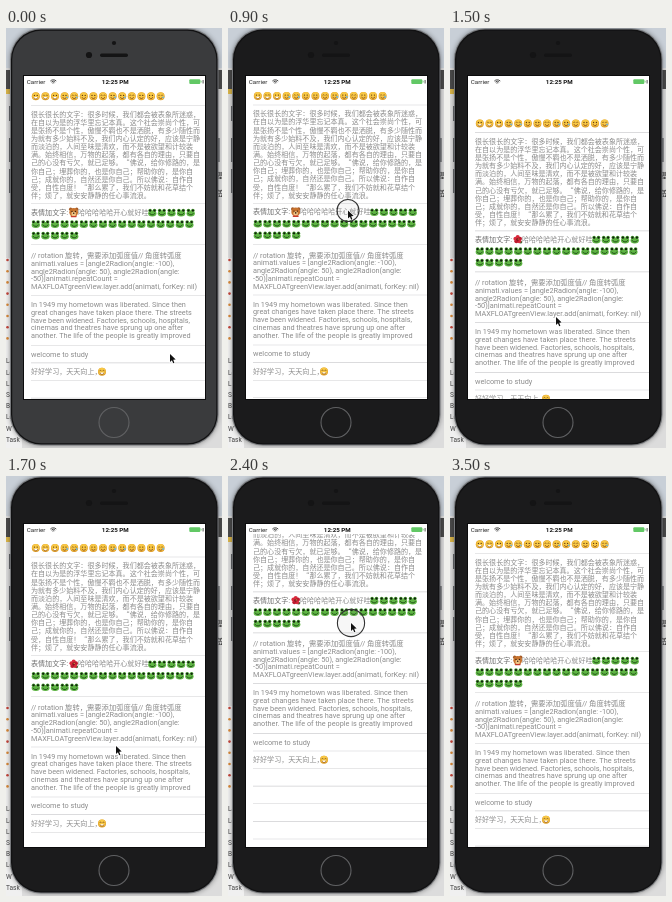
Write an HTML page with a canvas that moves like this. It is 216x420 px and loops after 3.6 s.

```html
<!DOCTYPE html>
<html lang="zh">
<head>
<meta charset="utf-8">
<title>Simulator scrolling</title>
<style>
html, body { margin: 0; width: 100%; height: 100%; overflow: hidden; background: #ddd; }
canvas { display: block; width: 216px; height: 420px; }
</style>
</head>
<body>
<canvas id="stage"></canvas>
<script>
const W = 216, H = 420, LOOP = 3600, STEP = 100;
const SCREEN = { x: 18, y: 48, w: 181, h: 323 };
const LEFT = 25, CJK = 7.06, LATIN = 7.3, EMOJI = 9.6;
const GRAY = '#8b8b8b';
const SANS = 'Roboto, "Noto Sans CJK SC", "Noto Sans CJK", sans-serif';
const HAN = '"Noto Sans CJK SC", "Noto Sans CJK", sans-serif';

const canvas = document.getElementById('stage');
const g = canvas.getContext('2d');
const dpr = window.devicePixelRatio || 1;
canvas.width = W * dpr;
canvas.height = H * dpr;

const essay = [
  '很长很长的文字：很多时候，我们都会被表象所迷惑，',
  '在自以为是的浮华里忘记本真。这个社会崇尚个性，可',
  '是张扬不是个性，傲慢不羁也不是洒脱，有多少随性而',
  '为就有多少始料不及，我们内心认定的好，应该是宁静',
  '而淡泊的，人间至味是清欢，而不是被欲望和计较装',
  '满。始终相信，万物的起落，都有各自的理由，只要自',
  '己的心没有亏欠，就已足够。“佛说，给你修路的，是',
  '你自己；埋葬你的，也是你自己；帮助你的，是你自',
  '己；成就你的，自然还是你自己。所以佛说：自作自',
  '受，自性自度！“那么累了，我们不妨就和花草结个',
  '伴；烦了，就安安静静的任心事流浪。'
];
const code = [
  '// rotation 旋转，需要添加弧度值// 角度转弧度',
  'animati.values = [angle2Radion(angle: -100),',
  'angle2Radion(angle: 50), angle2Radion(angle:',
  '-50)]animati.repeatCount =',
  'MAXFLOATgreenView.layer.add(animati, forKey: nil)'
];
const story = [
  'In 1949 my hometown was liberated. Since then',
  'great changes have taken place there. The streets',
  'have been widened. Factories, schools, hospitals,',
  'cinemas and theatres have sprung up one after',
  'another. The life of the people is greatly improved'
];

// Pointer path: time, x, y
const path = [
  [0, 164, 326], [300, 160, 320], [500, 158, 316], [850, 120, 182], [950, 120, 183],
  [1350, 106, 289], [1500, 106, 289], [1700, 110, 270], [1800, 111, 262],
  [2000, 115, 193], [2400, 123, 147], [2500, 123, 147], [2800, 123, 148],
  [3300, 235, 250], [3600, 235, 250]
];
const drags = [
  { down: 850, up: 1370, from: 183 },
  { down: 1720, up: 2460, from: 262 }
];

const clamp = (v, a, b) => Math.min(b, Math.max(a, v));
const smooth = p => p * p * (3 - 2 * p);

function pointer(t) {
  let i = 1;
  while (i < path.length - 1 && path[i][0] < t) i++;
  const [t0, x0, y0] = path[i - 1], [t1, x1, y1] = path[i];
  const p = smooth(clamp((t - t0) / (t1 - t0), 0, 1));
  return { x: x0 + (x1 - x0) * p, y: y0 + (y1 - y0) * p };
}

function rubber(d) {
  const size = SCREEN.h;
  return Math.sign(d) * size * (1 - 1 / (Math.abs(d) * 0.64 / size + 1));
}

function scrollAt(t) {
  const drag = drags.filter(d => t >= d.down).pop();
  if (!drag) return 0;
  const pull = rubber(pointer(Math.min(t, drag.up)).y - drag.from);
  if (t <= drag.up) return pull;
  const s = (t - drag.up) / 75;
  return s > 4.4 ? 0 : pull * (1 + s) * Math.exp(-s);
}

function disc(x, y, r, fill) {
  g.fillStyle = fill;
  g.beginPath();
  g.arc(x, y, r, 0, Math.PI * 2);
  g.fill();
}

function ring(x, y, r, color, width, a = 0, b = Math.PI * 2) {
  g.strokeStyle = color;
  g.lineWidth = width;
  g.beginPath();
  g.arc(x, y, r, a, b);
  g.stroke();
}

function box(x, y, w, h, fill, r = 0) {
  g.fillStyle = fill;
  g.beginPath();
  g.roundRect(x, y, w, h, r);
  g.fill();
}

function text(str, x, y, size, color, family = SANS, align = 'left', weight = 400) {
  g.font = `${weight} ${size}px ${family}`;
  g.fillStyle = color;
  g.textAlign = align;
  g.textBaseline = 'alphabetic';
  g.fillText(str, x, y + size * 0.36);
}

function lines(list, y, gap, size, family) {
  list.forEach((s, i) => text(s, LEFT, y + i * gap, size, GRAY, family));
}

// Draws n glyphs side by side, starting at the left edge x
function emojis(glyph, n, x, y) {
  for (let i = 0; i < n; i++) glyph(x + (i + 0.5) * EMOJI, y, i);
}

function face(x, y, kind) {
  disc(x, y, 4, '#dd9a24');
  disc(x, y - 0.4, 3.5, '#f8c845');
  if (kind % 3 === 1) {
    ring(x - 1.5, y - 0.5, 0.8, '#70451a', 0.6, Math.PI, 0);
    ring(x + 1.5, y - 0.5, 0.8, '#70451a', 0.6, Math.PI, 0);
  } else {
    disc(x - 1.4, y - 0.9, 0.65, '#593610');
    disc(x + 1.4, y - 0.9, 0.65, '#593610');
  }
  if (kind < 3) {
    box(x - 2, y + 0.8, 4, 1.4, '#fff', 0.6);
    ring(x, y + 0.9, 1.9, '#8a4c1b', 0.6, 0, Math.PI);
  } else {
    ring(x, y + 0.5, 1.8, '#8a4c1b', 0.8, 0.15, Math.PI - 0.15);
  }
  if (kind % 5 > 2) disc(x + 2.6, y + 1, 0.9, '#67b7e8');
}

function frog(x, y) {
  for (const s of [-1, 1]) disc(x + s * 2.2, y - 2, 1.8, '#4a9c35');
  g.fillStyle = '#5fb544';
  g.beginPath();
  g.ellipse(x, y + 0.9, 4.2, 3, 0, 0, Math.PI * 2);
  g.fill();
  for (const s of [-1, 1]) disc(x + s * 2.2, y - 1.9, 1.15, '#10200c');
  ring(x, y - 0.6, 3, '#1d4a17', 0.9, 0.4, Math.PI - 0.4);
}

function bear(x, y) {
  for (const s of [-1, 1]) disc(x + s * 3, y - 3, 1.7, '#a35a27');
  disc(x, y, 4.4, '#c7732f');
  disc(x, y + 1.6, 2.3, '#f0c487');
  for (const s of [-1, 1]) disc(x + s * 1.7, y - 0.9, 0.65, '#35200f');
  disc(x, y + 0.9, 0.8, '#35200f');
  box(x - 3, y + 3.6, 6, 1.3, '#c83a2c', 0.6);
}

function flower(x, y) {
  disc(x + 3, y + 2.8, 1.4, '#3e6b34');
  for (let i = 0; i < 5; i++) {
    const a = i * Math.PI * 0.4 - Math.PI / 2;
    disc(x + Math.cos(a) * 2.4, y + Math.sin(a) * 2.4, 2, i % 2 ? '#bd1a2e' : '#d92a3c');
  }
  disc(x, y, 1.4, '#7c1020');
  disc(x + 0.5, y - 0.4, 0.6, '#f2bd48');
}

function separator(y) {
  box(LEFT, y, SCREEN.x + SCREEN.w - LEFT, 0.6, '#cfcfd2');
}

function table(dy, red) {
  g.save();
  g.beginPath();
  g.rect(SCREEN.x, 58, SCREEN.w, SCREEN.y + SCREEN.h - 58);
  g.clip();
  g.translate(0, dy);
  emojis(face, 14, LEFT, 68.3);
  lines(essay, 86, 8.15, CJK, HAN);

  text('表情加文字:', LEFT, 184, CJK, '#6c6c6c', HAN);
  (red ? flower : bear)(67.7, 184.3);
  text('哈哈哈哈哈开心就好哇', 72, 184, CJK, GRAY, HAN);
  emojis(frog, 5, 141.5, 184.5);
  emojis(frog, 17, LEFT, 196);
  emojis(frog, 5, LEFT, 207.5);

  lines(code, 227.3, 7.8, LATIN);
  lines(story, 276.3, 7.8, LATIN);
  text('welcome to study', LEFT, 326, LATIN, GRAY);
  text('好好学习，天天向上，', LEFT, 343.7, CJK, GRAY, HAN);
  face(96, 343.7, 1);
  [77, 175.5, 216.5, 267, 317].forEach(separator);
  for (let i = 0; i < 7; i++) separator(334.6 + i * 17.6);
  g.restore();
}

function statusBar() {
  text('Carrier', 20.8, 53.7, 6.2, '#222');
  for (let i = 0; i < 3; i++) ring(47.3, 56, 1.2 + i * 1.5, '#222', 0.8, Math.PI * 1.25, Math.PI * 1.75);
  text('12:25 PM', 109.3, 53.7, 6.2, '#111', SANS, 'center', 600);
  box(183.3, 51.3, 11, 4.8, '#62c865', 1);
  box(194.7, 52.8, 0.8, 1.8, '#62c865');
  box(196.6, 52, 1, 3.4, '#555');
}

function desktop() {
  box(0, 0, W, H, '#dcdcdc');
  box(0, 0, W, 40, '#c8cfd7');
  box(0, 42, 8, 19, '#4b4b4b');
  box(211, 42, 5, 19, '#4b4b4b');
  box(0, 61, 6, 5, '#d9b54a');
  box(0, 230, 16, 190, '#f0f0f0');
  for (let i = 0; i < 8; i++) disc(1.5, 232 + i * 11.2, 1.3, i % 3 ? '#d8893a' : '#c4453a');
  ['La', 'Le', 'Li', 'Sp', 'Ba', 'Lo', 'W', 'Task'].forEach((s, i) => text(s, 0, 333 + i * 11.2, 6.5, '#444'));
  text('基', 211, 147, 7, '#222', HAN);
  text('笠', 211, 165, 7, '#222', HAN);
}

function phone(shade) {
  g.save();
  g.shadowColor = 'rgba(0,0,0,.4)';
  g.shadowBlur = 5 * dpr;
  box(4, 0.5, 208.5, 417, '#77797c', 31);
  g.restore();
  box(5, 1.5, 206.5, 415, '#111112', 30);
  box(6.2, 2.7, 204.1, 412.6, shade, 29);
  box(3, 78, 1.4, 15, '#55575a');
  box(3, 110, 1.4, 24, '#55575a');
  box(3, 141, 1.4, 24, '#55575a');
  box(212.2, 110, 1.4, 24, '#55575a');
  disc(108, 15, 2.1, '#141415');
  disc(83, 27, 3.1, '#141415');
  box(94, 25.5, 28, 3.4, '#141415', 1.7);
  ring(108, 394.5, 15, '#606163', 1.1);
  box(SCREEN.x - 1, SCREEN.y - 1, SCREEN.w + 2, SCREEN.h + 2, '#0b0b0c');
  box(SCREEN.x, SCREEN.y, SCREEN.w, SCREEN.h, '#fff');
}

function arrow({ x, y }) {
  const shape = [[0, 0], [0, 8], [1.9, 6.3], [3.2, 9.2], [4.4, 8.7], [3.2, 5.8], [5.7, 5.6]];
  g.beginPath();
  shape.forEach(([dx, dy]) => g.lineTo(x + dx, y + dy));
  g.closePath();
  g.lineJoin = 'round';
  g.lineWidth = 1.2;
  g.strokeStyle = '#fff';
  g.stroke();
  g.fillStyle = '#111';
  g.fill();
}

function touch({ x, y }, age) {
  const r = 11 + 2.6 * clamp((age - 50) / 100, 0, 1);
  disc(x, y, r, 'rgba(120,120,120,.06)');
  ring(x, y, r, '#333', 1.1);
}

function draw(t) {
  g.setTransform(dpr, 0, 0, dpr, 0, 0);
  desktop();
  phone(t < 500 ? '#3a3b3d' : '#1b1b1c');
  table(scrollAt(t), t >= 1100 && t < 2600);
  statusBar();
  const p = pointer(t);
  const held = drags.find(d => t >= d.down && t <= d.up);
  if (held) touch(p, t - held.down);
  arrow(p);
}

const start = performance.now();
function tick() {
  const t = (performance.now() - start) % LOOP;
  draw(Math.floor(t / STEP) * STEP);
  requestAnimationFrame(tick);
}
tick();
</script>
</body>
</html>
```
